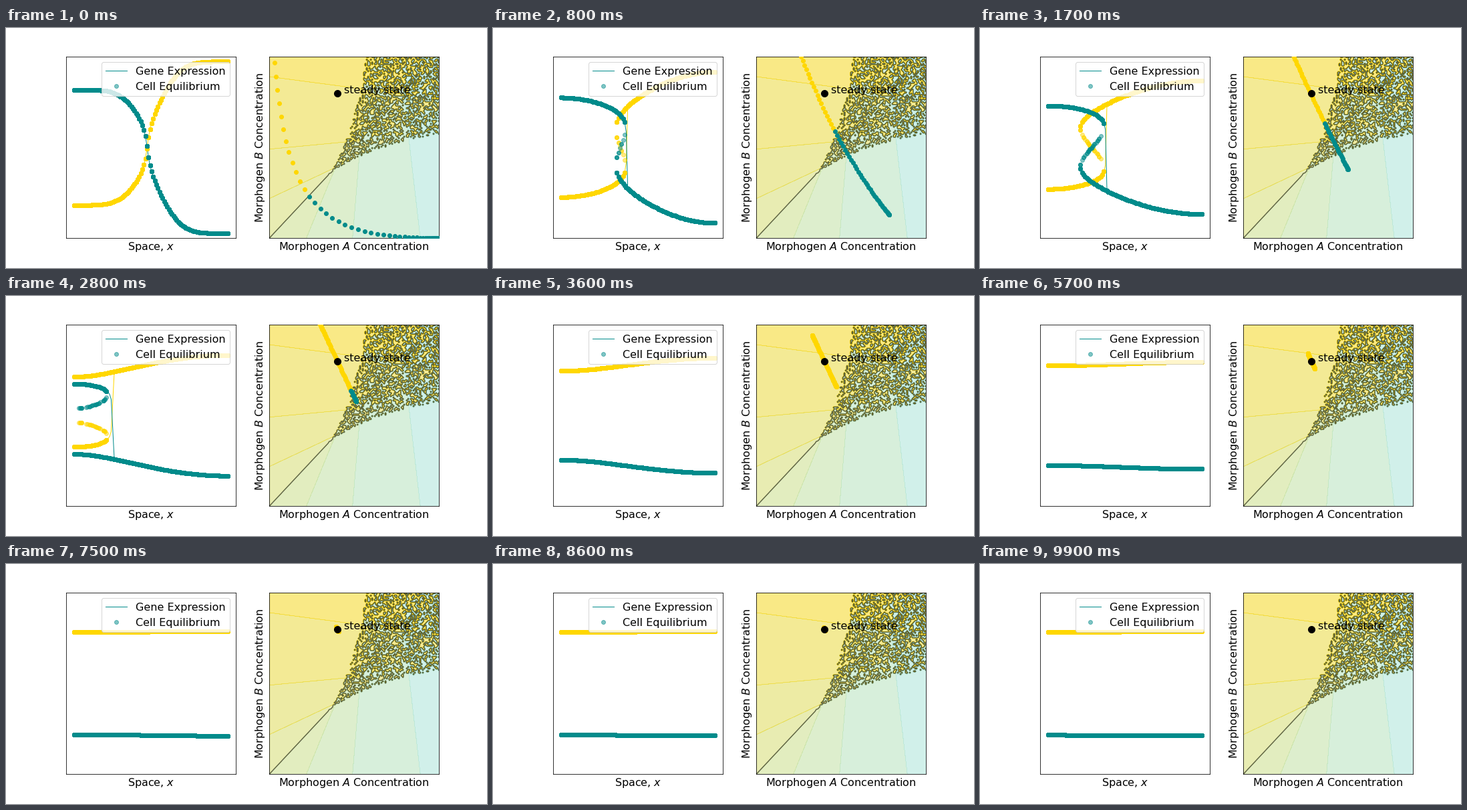
Recreate the animation shown at these times as a matplotlib script. Size 720 px wide and 360 px high, loop 10000 ms.

```python
import numpy as np
import matplotlib.pyplot as plt
from matplotlib.animation import FuncAnimation
from matplotlib.colors import LinearSegmentedColormap

FRAMES, INTERVAL = 100, 100
CELLS, GRID = 100, 128
GOLD, TEAL = "gold", "darkcyan"
DECAY = 0.0583         # decay of the slowest diffusion mode per frame
RATE, SUBSTEPS = 30.0, 150

plt.rcParams.update({
    "font.family": "DejaVu Sans",
    "font.size": 16,
    "figure.subplot.left": 0.125,
    "figure.subplot.right": 0.9,
    "figure.subplot.bottom": 0.125,
    "figure.subplot.top": 0.88,
    "figure.subplot.wspace": 0.2,
})

x = np.linspace(0, 1, CELLS)
modes = np.arange(1, 30)[:, None]
waves = np.cos(modes * np.pi * x)


def morphogens(n):
    """Two opposing steps smoothed by no-flux diffusion."""
    damp = 2 / (modes * np.pi) * np.exp(-DECAY * modes**2 * (n + 0.92))
    a = 0.4 + (damp * np.sin(0.4 * np.pi * modes) * waves).sum(0)
    b = 0.8 - 2 * (damp * np.sin(0.6 * np.pi * modes) * waves).sum(0)
    return a, b


def controls(a, b):
    """Coefficients of the switch  g' = -g^3 + p g + s."""
    return 0.394 * (a + b) - 0.274 + 1e-9, 0.182 * (a - b)


def equilibria(p, s):
    """Low, middle and high root; all equal where only one is real."""
    p = p.astype(complex)
    phi = np.arccos(1.5 * s / p * np.sqrt(3 / p)) / 3
    z = np.array([2 * np.sqrt(p / 3) * np.cos(phi - 2 * np.pi * k / 3)
                  for k in range(3)])
    only = np.take_along_axis(z.real, abs(z.imag).argmin(0)[None], 0)
    bistable = 4 * p.real**3 > 27 * s**2
    bistable &= p.real > 0
    return np.where(bistable, np.sort(z.real, 0), only), bistable


def simulate():
    """Gene state of every cell in every frame."""
    history = []
    p, s = controls(*morphogens(0))
    roots, _ = equilibria(p, s)
    g = np.where(s > 0, roots[2], roots[0])
    for n in range(FRAMES):
        p, s = controls(*morphogens(n))
        for _ in range(SUBSTEPS):
            g = g + RATE / SUBSTEPS * (p * g - g**3 + s)
        history.append(g)
    return history


genes = simulate()

fig, (left, right) = plt.subplots(1, 2, figsize=(10, 5), dpi=72)
for ax in (left, right):
    ax.set_xticks([])
    ax.set_yticks([])

# Gene expression along space
left.set_xlim(-0.05, 1.05)
left.set_ylim(-1, 1)
left.set_xlabel("Space, $x$")


def dots(ax, color, alpha=1, **kw):
    return ax.plot([], [], "o", color=color, ms=6, alpha=alpha, **kw)[0]


signs = {GOLD: -1, TEAL: 1}
lines = {c: left.plot([], [], color=c, lw=1)[0] for c in signs}
steady = {c: dots(left, c, 0.5) for c in signs}
left.legend([lines[TEAL], steady[TEAL]],
            ["Gene Expression", "Cell Equilibrium"],
            loc="upper right", bbox_to_anchor=(0.998, 1))

# Phase plane: cells in the bistable wedge settle at random
axis = np.linspace(0, 1, GRID)
A, B = np.meshgrid(axis, axis)
roots, bistable = equilibria(*controls(A, B))
start = np.random.default_rng(4).uniform(-1, 1, A.shape)
field = np.where(start > roots[1], roots[2], roots[0])
field = np.where(bistable, field, roots[1])

steps = np.array([0.18, 0.387, 0.592, 0.8])
cmap = LinearSegmentedColormap.from_list(
    "fate", [(0.985, 0.83, 0.0), (0.62, 0.895, 0.9)])
right.contourf(A, B, field, levels=[*-steps[::-1], 0, *steps], cmap=cmap,
               alpha=0.5)
right.contour(A, B, field, levels=-steps[2::-1], colors=GOLD,
              linewidths=0.7, alpha=0.45, linestyles="solid")
right.contour(A, B, field, levels=[0], colors="black", linewidths=1.5,
              alpha=0.55)
right.set_xlim(0, 1)
right.set_ylim(0, 1)
right.set_xlabel("Morphogen $A$ Concentration")
right.set_ylabel("Morphogen $B$ Concentration")
cells = {c: dots(right, c, zorder=3) for c in signs}
right.plot(0.4, 0.8, "o", color="black", ms=10, zorder=4)
right.text(0.44, 0.8, "steady state", zorder=5)


def update(n):
    a, b = morphogens(n)
    g = genes[n]
    (low, mid, high), bistable = equilibria(*controls(a, b))
    # Repeated solver hits: always on stable roots, now and then on others
    hits = np.random.default_rng(n).random((3, CELLS)) < 0.5
    rows, cols = np.nonzero(hits & bistable)
    px = np.concatenate([np.tile(x, 16), x[cols]])
    py = np.concatenate([np.tile(low, 8), np.tile(high, 8), mid[cols]])
    for color, sign in signs.items():
        lines[color].set_data(x, sign * g)
        steady[color].set_data(px, sign * py)
        own = sign * g > 0
        cells[color].set_data(a[own], b[own])
    return []


anim = FuncAnimation(fig, update, frames=FRAMES, interval=INTERVAL,
                     repeat=True, repeat_delay=0, blit=False)
plt.show()
```
